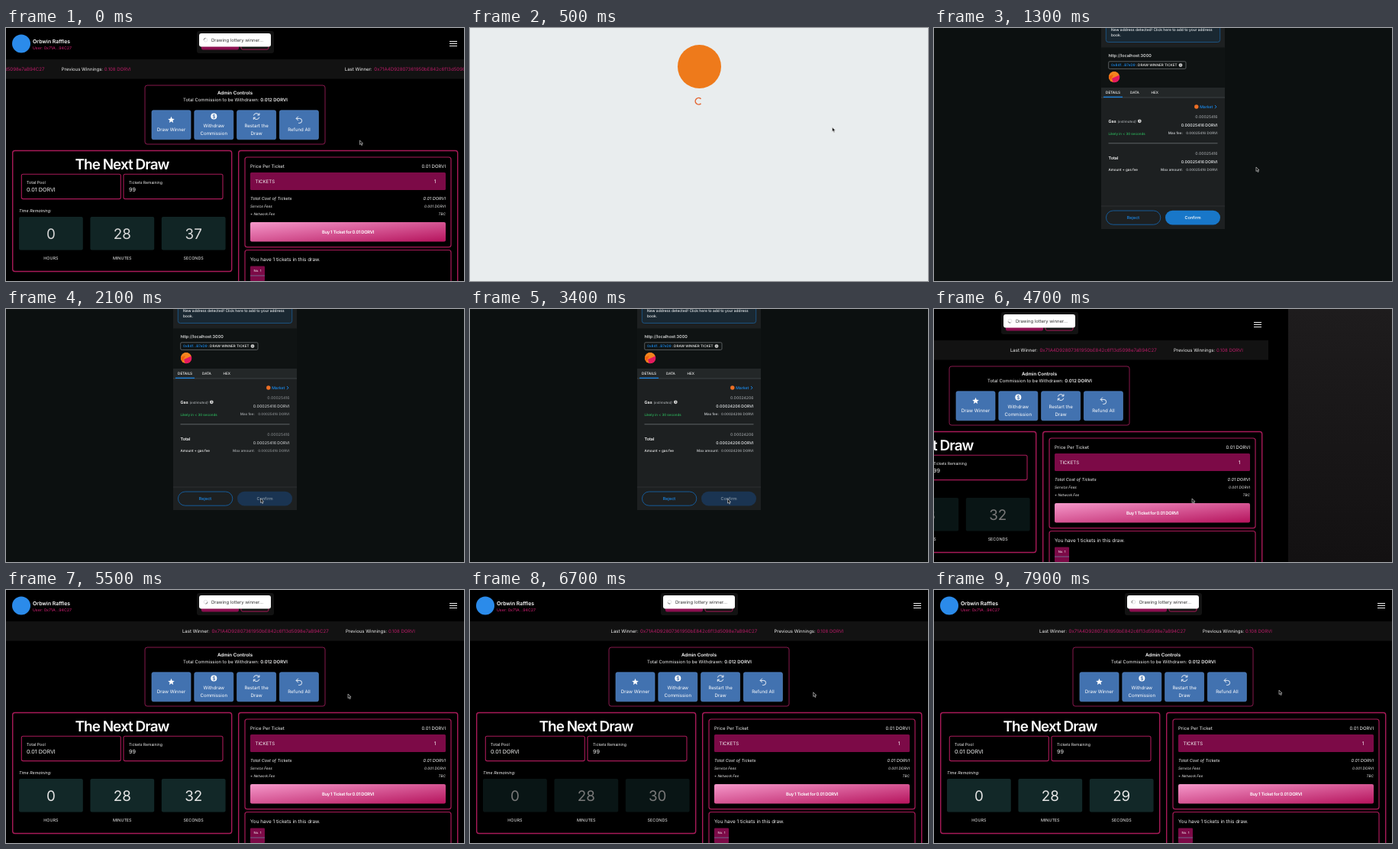
These frames come from a looping animation (600x331 px, 8 s). An HTML page:

```html
<!DOCTYPE html>
<html lang="en">
<head>
<meta charset="utf-8">
<title>Raffle draw</title>
<style>
  html, body { margin: 0; width: 100%; height: 100%; overflow: hidden; background: #000; }
  #stage { display: block; width: 600px; height: 331px; }
  text { font-family: Inter, "Liberation Sans", Arial, sans-serif; text-rendering: geometricPrecision; white-space: pre; }
</style>
</head>
<body>
<svg id="stage" viewBox="0 0 600 331"></svg>
<script>
const LOOP = 8000, STEP = 100, SPACE = 626;
const COIN = 'DORVI';
const WALLET = '0x71A4D92807361950bE842c6f13d5098e7aB94C27';
const PINK = '#b81c66', EDGE = '#a81a58', WINE = '#7c0a47', BLUE = '#1a8cf0';

// Markup helpers
const text = (x, y, size, str, fill = '#f2f2f2', extra = '') =>
  `<text x="${x}" y="${y}" font-size="${size}" fill="${fill}" ${extra}>${str}</text>`;
const rect = (x, y, r, b, fill, rx = 0, extra = '') =>
  `<rect x="${x}" y="${y}" width="${r - x}" height="${b - y}" rx="${rx}" fill="${fill}" ${extra}/>`;
const frame = (x, y, r, b, color = EDGE, w = 1.2, rx = 3, fill = 'none') =>
  rect(x, y, r, b, fill, rx, `stroke="${color}" stroke-width="${w}"`);
const circle = (x, y, r, fill, extra = '') => `<circle cx="${x}" cy="${y}" r="${r}" fill="${fill}" ${extra}/>`;
const path = (d, color, w = 1, extra = '') =>
  `<path d="${d}" fill="none" stroke="${color}" stroke-width="${w}" ${extra}/>`;
const MID = ' text-anchor="middle"', END = ' text-anchor="end"';
const BOLD = ' font-weight="600"', SEMI = ' font-weight="500"', ITALIC = ' font-style="italic"';

function star(cx, cy, r) {
  const pts = Array.from({ length: 10 }, (_, i) => {
    const a = i * Math.PI / 5 - Math.PI / 2, k = i % 2 ? r * 0.45 : r;
    return `${cx + k * Math.cos(a)},${cy + k * Math.sin(a)}`;
  });
  return `<polygon points="${pts.join(' ')}" fill="#fff"/>`;
}

function header() {
  return circle(20, 20.5, 12, '#2b8bea') +
    text(35, 20, 6.9, 'Orbwin Raffles', '#fff', BOLD) +
    text(35, 28.2, 5.2, 'User: 0x71A...94C27', PINK, SEMI) +
    path('M581 17.5h10M581 20.5h10M581 23.5h10', '#eee', 1.1) +
    rect(250, 4, 351, 33, '#121212', 3) +
    rect(256, 12, 305, 28.5, '#8c1050', 2) +
    frame(308, 12, 344, 28, EDGE, 1, 2) +
    rect(253, 7, 347, 24.5, '#fff', 3) +
    circle(261.5, 15.7, 2.4, 'none', 'stroke="#ddd" stroke-width=".8"') +
    `<g id="toastSpin">${path('M261.5 13.3a2.4 2.4 0 0 1 2.4 2.4', '#666', 0.8)}</g>` +
    text(269, 18, 5.9, 'Drawing lottery winner...', '#333');
}

function ticker() {
  const item = x => text(x, 56.4, 6.05, 'Last Winner:') +
    text(x + 38.5, 56.4, 6.15, WALLET, PINK) +
    text(x + 214, 56.4, 6, 'Previous Winnings:') +
    text(x + 270, 56.4, 6, '0.108 ' + COIN, PINK);
  return rect(0, 41, 600, 66.5, '#121212') + `<g id="ticker">${item(0)}${item(-585)}${item(585)}</g>`;
}

function admin() {
  const icons = [
    star(216.5, 120.3, 4.5),
    circle(272.3, 115.5, 4, '#fff') + text(272.3, 118, 6.6, '$', '#4272b0', BOLD + MID),
    path('M324.4 114.5a3.8 3.8 0 0 1 7-.9M331.8 116.7a3.8 3.8 0 0 1-7 .9M331.9 111.4v2.6h-2.6M324.3 119.8v-2.6h2.6', '#fff', 0.9),
    path('M382.8 115.7l-2.7 2.7 2.7 2.7M380.3 118.4h4.3a3 3 0 0 1 0 6h-1.4', '#fff', 0.9)
  ];
  const labels = [['Draw Winner'], ['Withdraw', 'Commission'], ['Restart the', 'Draw'], ['Refund All']];
  return frame(182, 75, 418, 152, '#86184c', 1) +
    text(300, 87, 6.2, 'Admin Controls', '#fff', BOLD + MID) +
    text(300.5, 96.4, 5.95, `Total Commission to be Withdrawn: <tspan font-weight="600">0.012 ${COIN}</tspan>`, '#f2f2f2', MID) +
    labels.map((lines, i) => {
      const x = 191 + i * 55.8, y = lines.length > 1 ? 130.4 : 135.4;
      return frame(x, 107.8, x + 51, 145.8, '#5585c0', 0.7, 2, '#4272b0') + icons[i] +
        lines.map((s, k) => text(x + 25.5, y + k * 10, 6.1, s, '#fff', MID)).join('');
    }).join('');
}

function drawPanel() {
  const units = [['HOURS', 17], ['MINUTES', 110.4], ['SECONDS', 203.8]];
  return frame(8.7, 160.5, 295.7, 318.5, EDGE, 1.4) +
    text(152, 185.4, 18.9, 'The Next Draw', '#fff', BOLD + MID + ' letter-spacing="-.95"') +
    frame(20.3, 191.2, 150.3, 223.6, EDGE, 1.1, 2) + frame(154, 191.2, 284, 223.6, EDGE, 1.1, 2) +
    text(27, 203.7, 5.3, 'Total Pool') + text(27, 214.4, 7.2, '0.01 ' + COIN) +
    text(161, 203.7, 5.1, 'Tickets Remaining') + text(161, 214.4, 7.2, '99') +
    text(17, 241.2, 5.4, 'Time Remaining:', '#f2f2f2', ITALIC) +
    '<g id="clock">' + units.map(([name, x], i) =>
      rect(x, 247, x + 83.8, 290.5, '#132a2a', 2) +
      text(x + 41.9, 275.7, 18.8, ['0', '28', '37'][i], '#f0f0f0', MID + ` id="${name}"`)).join('') + '</g>' +
    units.map(([name, x]) => text(x + 41.9, 303.2, 5.4, name, '#f2f2f2', MID)).join('');
}

function buyPanel() {
  const row = (y, size, a, b, style = '') =>
    text(320, y, size, a, '#f2f2f2', style) + text(576, y, size, b, '#f2f2f2', style + END);
  return frame(304.7, 160.5, 591.7, 345, EDGE, 1.4) +
    frame(313, 169, 583, 286.7) +
    row(183, 6, 'Price Per Ticket', '0.01 ' + COIN) +
    rect(320, 189, 576, 212, WINE, 1.5) +
    text(326.5, 202.7, 6.1, 'TICKETS') + text(562, 202.7, 6.4, '1', '#fff', MID) +
    row(225.4, 5.6, 'Total Cost of Tickets', '0.01 ' + COIN, ITALIC) +
    row(235.3, 4.75, 'Service Fees', '0.001 ' + COIN, ITALIC) +
    row(245.1, 4.65, '+ Network Fee', 'TBC', ITALIC) +
    rect(320, 254, 576, 279.6, 'url(#rose)', 2) +
    text(448, 269.3, 5.8, `Buy 1 Ticket for 0.01 ${COIN}`, '#fff', BOLD + MID + ' letter-spacing="-.28"') +
    frame(313, 290.5, 583, 345) +
    text(320, 305, 6.4, 'You have 1 tickets in this draw.') +
    rect(320, 311.5, 339, 331, WINE, 1) + text(329.5, 319.4, 4.2, 'No. 1', '#fff', MID) +
    path('M320 324h19', '#6c7fa0', 0.8);
}

function wallet() {
  const info = (x, y) => circle(x, y, 2.4, '#ccc') + text(x, y + 1.5, 4, 'i', '#1d2021', BOLD + MID);
  const fee = (y, label) =>
    text(371.5, y, 5.1, '', '#a0a4a7', END + ' class="gas"') +
    text(371.5, y + 11, 5.2, '', '#e0e3e5', END + BOLD + ' class="gas coin"') +
    text(326, y + 21, 4.6, label, '#c0c4c7', END + BOLD) +
    text(371.5, y + 21, 4.55, '', '#b0b4b7', END + ' class="gas coin"');
  return rect(0, 0, 600, 331, '#0c1010') +
    '<g font-weight="500">' +
    rect(219, 0, 381, 263, '#1d2021') +
    rect(219, 25.5, 381, 78, '#0f1313') +
    frame(225.3, -10, 374.7, 18.5, '#1c5f96', 0.8, 3, '#1a2832') +
    text(232, 4, 4.9, 'New address detected! Click here to add to your address', '#f0f2f4') +
    text(232, 11, 4.9, 'book.', '#f0f2f4') +
    text(228.5, 38.2, 5.55, 'http://localhost:3000') +
    frame(228.7, 43.8, 330, 53.4, '#777b7e', 0.7, 1.5) +
    text(232, 50.4, 4.65, '0x84f...B7eD9', BLUE) +
    text(264.5, 50.4, 4.6, ': DRAW WINNER TICKET') + info(323, 48.6) +
    `<g clip-path="url(#badge)">${circle(236, 64, 7.3, '#f5841f')}
      <path d="M233 66l11-5v12h-9z" fill="#e3195f"/><path d="M229 63l6-2-4 8z" fill="#f2600c"/></g>` +
    rect(219, 78, 381, 91, '#232728') +
    text(225, 85.5, 4.7, 'DETAILS', '#fff') + text(257, 85.5, 4.6, 'DATA') + text(284.5, 85.5, 4.6, 'HEX') +
    path('M219 91h162', '#45494c', 0.8) + path('M222 90.3h25', BLUE, 1.2) +
    circle(343.8, 103, 2.7, '#ee6f25') + text(348.2, 105, 5.1, 'Market', BLUE) +
    path('M368 101l2 2.1-2 2.1', BLUE, 0.9) +
    text(228.5, 123.8, 5.4, 'Gas', '#fff', BOLD) + text(240.5, 123.6, 4.45, '(estimated)', '#a5a9ac', ITALIC) + info(269.3, 121.8) +
    text(228.5, 139.5, 4.5, 'Likely in &lt; 30 seconds', '#2cb65c') +
    path('M228.5 150.8h143', '#666a6d', 0.9) +
    text(228.5, 171.6, 5.4, 'Total', '#fff', BOLD) + text(228.5, 187.4, 4.55, 'Amount + gas fee') +
    `<g id="fees">${fee(118.4, 'Max fee:')}${fee(166.4, 'Max amount:')}</g>` +
    path('M219 233h162', '#303437', 0.8) +
    frame(225.5, 239, 296.8, 257.2, '#1660a4', 0.9, 9.1) +
    text(261, 250, 5.5, 'Reject', BLUE, MID) +
    rect(303, 238.8, 375, 257.4, '', 9.3, 'id="okBox"') +
    text(339, 250, 5.5, 'Confirm', '#fff', MID + ' id="okText"') +
    '</g>';
}

const space = (id, body) => `<svg id="${id}" width="600" height="331">${body}</svg>`;
const stage = document.getElementById('stage');
stage.innerHTML = `<defs>
  <linearGradient id="rose" x2="1" y2="1"><stop offset="0" stop-color="#f598ca"/><stop offset="1" stop-color="#b5135c"/></linearGradient>
  <linearGradient id="dusk" x2="0" y2="1"><stop offset="0" stop-color="#1e1c1d"/><stop offset="1" stop-color="#131112"/></linearGradient>
  <clipPath id="badge"><circle cx="236" cy="64" r="7.3"/></clipPath></defs>` +
  rect(0, 0, 600, 331, '#000') +
  space('page', header() + ticker() + admin() + drawPanel() + buyPanel()) +
  space('loading', rect(0, 0, 600, 331, '#e9edee') + circle(300.5, 50.5, 28.5, '#ee7a1b') +
    `<g id="loadSpin">${path('M302.5 92.7a4.3 4.3 0 1 0 0 6.2', '#e4632f', 1.5)}</g>`) +
  space('wallet', wallet()) +
  space('blank', rect(0, 0, 600, 331, 'url(#dusk)')) +
  '<path id="cursor" d="M0 0v5.6l1.3-1.2 1 2.2 1-.5-1-2.1h1.8z" fill="#111" stroke="#ddd" stroke-width=".6"/>';

const $ = id => document.getElementById(id);
const clamp = v => Math.max(0, Math.min(1, v));
const smooth = u => u * u * (3 - 2 * u);

// time, x, y of the pointer tip
const POINTER = [
  [0, 463.5, 147], [400, 474.5, 130], [1000, 474.5, 130], [1700, 341, 262], [1900, 338, 267],
  [2100, 333.5, 248], [2700, 334, 248], [3400, 337.5, 248.5], [4700, 338, 248],
  [5400, 448, 136], [5700, 448, 136], [7900, 452, 131]
];

function pointerAt(t) {
  const i = POINTER.findIndex(p => p[0] > t);
  if (i < 0) return POINTER.at(-1).slice(1);
  const [a, b] = [POINTER[i - 1], POINTER[i]];
  const u = smooth((t - a[0]) / (b[0] - a[0]));
  return [a[1] + (b[1] - a[1]) * u, a[2] + (b[2] - a[2]) * u];
}

function slideAt(t) {
  if (t < 2000) return -SPACE * smooth(clamp((t - 50) / 400));
  return -SPACE * Math.pow(1 - clamp((t - 4300) / 900), 2.3);
}

function draw(t) {
  const s = t / 1000, off = slideAt(t);
  const current = t < 1100 ? 'loading' : t < 4000 ? 'wallet' : 'blank';
  $('page').setAttribute('x', off);
  for (const id of ['loading', 'wallet', 'blank']) {
    $(id).setAttribute('x', off + SPACE);
    $(id).style.display = id === current ? '' : 'none';
  }

  $('ticker').setAttribute('transform', `translate(${443.8 - 38.7 * s} 0)`);
  $('SECONDS').textContent = 37 - Math.floor(s + 0.4);
  $('clock').setAttribute('opacity', 0.75 + 0.25 * Math.cos(Math.PI * (s - 5.7)));
  $('toastSpin').setAttribute('transform', `rotate(${s * 360 - 90} 261.5 15.7)`);
  $('loadSpin').setAttribute('transform', `rotate(${(s - 0.5) * 360} 299.5 95.8)`);

  const gas = t < 2800 ? '0.00025416' : '0.00024206';
  for (const el of document.querySelectorAll('.gas'))
    el.textContent = el.classList.contains('coin') ? `${gas} ${COIN}` : gas;
  $('fees').setAttribute('opacity', 0.87 - 0.13 * Math.cos(Math.PI * (s - 2.1)));
  const over = t >= 2000;
  $('okBox').setAttribute('fill', over ? '#1a3452' : '#1877c9');
  $('okText').setAttribute('fill', over ? '#8796a4' : '#fff');

  $('cursor').setAttribute('transform', `translate(${pointerAt(t)})`);
}

const start = performance.now();
function tick() {
  const t = Math.max(0, performance.now() - start) % LOOP;
  draw(Math.floor(t / STEP) * STEP);
  requestAnimationFrame(tick);
}
tick();
</script>
</body>
</html>
```
